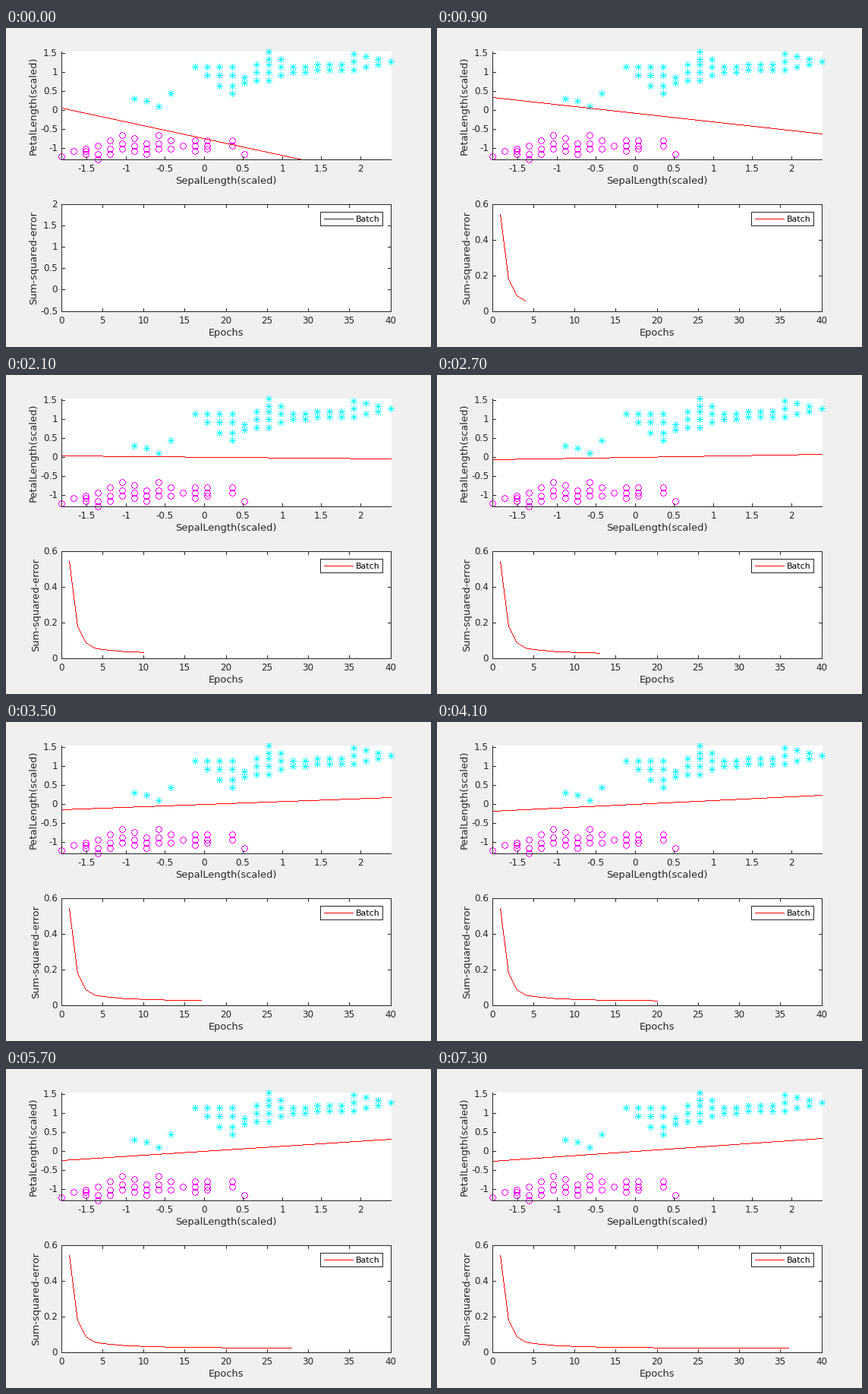
Recreate the animation shown at these times as a matplotlib script. Size 560 px wide and 420 px high, loop 7500 ms.

```python
import numpy as np
import matplotlib.pyplot as plt
from matplotlib.animation import FuncAnimation
from matplotlib.collections import LineCollection
from matplotlib.patches import Rectangle

W, H, DPI = 560, 420, 100
PX = 72 / DPI                      # one pixel in points
INK, RED, CYAN, MAGENTA = "#262626", "#ff0000", "#00ffff", "#ff00ff"
LEFT, RIGHT = 73, 507
TOP1, BOT1 = 31, 173
TOP2, BOT2 = 232, 373
EPOCHS, RATE = 36, 0.5

# sepal and petal length in mm: statistics and extremes
MEAN, SD = np.array([54.71, 28.61]), np.array([6.417, 14.4955])
(xmin, ymin), (xmax, ymax) = (np.array([[43, 10], [70, 51]]) - MEAN) / SD

# outline of each cluster: sepal length, lowest and highest petal length
SMALL = [(43, 11, 11), (44, 13, 14), (46, 10, 15), (48, 14, 19),
         (50, 12, 16), (51, 14, 19), (53, 15, 15), (54, 13, 17),
         (57, 15, 17), (58, 12, 12)]
LARGE = [(49, 33, 33), (51, 30, 30), (54, 45, 45), (57, 35, 45),
         (58, 39, 41), (60, 40, 51), (62, 43, 45), (66, 44, 46),
         (67, 44, 50), (70, 47, 47)]


def cluster(outline, spacing, gap):
    """Fill an outline with evenly spread points, one column per mm."""
    cols, low, high = np.transpose(outline)
    points = []
    for s in range(cols[0], cols[-1] + 1):
        if s == gap:
            continue
        lo, hi = np.interp(s, cols, low), np.interp(s, cols, high)
        count = 1 + round((hi - lo) / spacing)
        points += [(s, p) for p in np.rint(np.linspace(lo, hi, count))]
    return (np.array(points) - MEAN) / SD


def train():
    """Batch gradient descent: weights after and cost before each epoch."""
    cov = np.array([[1, 0, 0], [0, 0.99, 0.80434], [0, 0.80434, 0.99]])
    corr = np.array([0, 0.72464, 0.96513])
    w = np.array([0.95, 0.2382, 0.5035])
    weights, costs = [], []
    for _ in range(EPOCHS):
        costs.append((1 - 2 * corr @ w + w @ cov @ w) / 2)
        w = w + RATE * (corr - cov @ w)
        weights.append(w)
    return weights, np.array(costs)


weights, costs = train()


def to_px(v, lo, hi, a, b):
    """Map lo..hi to whole pixels a..b."""
    pos = a + (np.asarray(v, float) - lo) / (hi - lo) * (b - a)
    return np.floor(pos + 1e-6).astype(int)


def top_x(v):
    return to_px(v, xmin, xmax, LEFT, RIGHT)


def top_y(v):
    return to_px(v, ymax, ymin, TOP1, BOT1)


def epoch_x(v):
    return to_px(v, 0, 40, LEFT, RIGHT)


def trace(xs, ys, bottom):
    """Pixels of a polyline, cut off below the given row."""
    parts = [np.empty((0, 2))]
    for x0, y0, x1, y1 in zip(xs, ys, xs[1:], ys[1:]):
        n = max(abs(x1 - x0), abs(y1 - y0)) + 1
        parts.append(np.column_stack([np.linspace(x0, x1, n),
                                      np.linspace(y0, y1, n)]))
    pixels = np.rint(np.concatenate(parts))
    return dots(pixels[pixels[:, 1] <= bottom])


def dots(pixels):
    """One-pixel dashes."""
    p = np.asarray(pixels, float)
    return np.stack([p + (0, 0.5), p + (1, 0.5)], axis=1)


plt.rcParams["font.family"] = "DejaVu Sans"
fig = plt.figure(figsize=(W / DPI, H / DPI), dpi=DPI, facecolor="#f0f0f0")
ax = fig.add_axes([0, 0, 1, 1])
ax.set_xlim(0, W)
ax.set_ylim(H, 0)
ax.axis("off")


def text(x, y, s, size=12, ha="center", color=INK, rotation=0):
    return ax.text(x, y, s, fontsize=size * PX, ha=ha, va="baseline",
                   color=color, rotation=rotation, rotation_mode="anchor",
                   zorder=6)


def strokes(segments, color=INK, z=5):
    lines = LineCollection(segments, colors=color, linewidths=PX,
                           snap=False, zorder=z)
    return ax.add_collection(lines)


def panel(left, top, right, bottom, z=1):
    ax.add_patch(Rectangle((left, top), right + 1 - left, bottom + 1 - top,
                           facecolor="white", edgecolor="none", snap=False,
                           zorder=z))


def hline(y, x0, x1):
    return [(x0, y + 0.5), (x1 + 1, y + 0.5)]


def vline(x, y0, y1):
    return [(x + 0.5, y0), (x + 0.5, y1 + 1)]


def box(left, top, right, bottom):
    return [hline(top, left, right), hline(bottom, left, right),
            vline(left, top, bottom), vline(right, top, bottom)]


# upper panel: scatter and decision boundary
panel(LEFT, TOP1, RIGHT, BOT1)
segs = [hline(BOT1, LEFT, RIGHT), vline(LEFT, TOP1, BOT1)]
for v in np.arange(-1.5, 2.1, 0.5):
    x = int(top_x(v))
    segs.append(vline(x, BOT1 - 4, BOT1))
    text(x, 189, f"{v:g}")
for v in np.arange(-1, 1.6, 0.5):
    y = int(top_y(v))
    segs.append(hline(y, LEFT, LEFT + 4))
    text(68, y + 4.4, f"{v:g}", ha="right")
strokes(segs)
text(290, 205, "SepalLength(scaled)", 13)
text(40, 102.5, "PetalLength(scaled)", 13, rotation=90)

angles = np.radians(np.arange(0, 360, 15))
ring = np.rint(4 * np.column_stack([np.cos(angles), np.sin(angles)]))
star = np.array([(i * a, i * b) for i in range(-4, 5)
                 for a, b in ((1, 0), (0, 1), (1, 1), (1, -1))
                 if abs(i) < 4 or a * b == 0])
for points, shape, color in ((cluster(SMALL, 2, 56), ring, MAGENTA),
                             (cluster(LARGE, 3, 53), star, CYAN)):
    centres = np.column_stack([top_x(points[:, 0]), top_y(points[:, 1])])
    pixels = (centres[:, None] + shape[None]).reshape(-1, 2)
    strokes(dots(np.unique(pixels, axis=0)), color, 3)
boundary = strokes([], RED, 4)

# lower panel: error curve
panel(LEFT, TOP2, RIGHT, BOT2)
segs = box(LEFT, TOP2, RIGHT, BOT2)
for v in range(0, 41, 5):
    x = int(epoch_x(v))
    segs += [vline(x, BOT2 - 4, BOT2), vline(x, TOP2, TOP2 + 4)]
    text(x, 389, str(v))
strokes(segs)
text(289.5, 405, "Epochs", 13)
error_label = text(43, 302.5, "Sum-squared-error", 13, rotation=90)
y_labels = [text(68, 0, "", ha="right") for _ in range(6)]
y_marks = strokes([])
curve = strokes([], RED, 4)

# legend
panel(414, 242, 496, 260, 4.5)
strokes(box(414, 242, 496, 260))
key = strokes([hline(251, 419, 457)], RED, 6)
text(460.4, 255, "Batch", 11, ha="left", color="black")


def error_ticks(step):
    if step == 0:
        return np.arange(-1, 5) * 0.5
    if step == 1:
        return np.arange(1, 7) * 0.1
    return np.arange(4) * 0.2


def draw(i):
    step = max(0, (i * 100 - 300) // 200)

    b, w1, w2 = weights[step]
    ends = np.array([xmin, xmax])
    boundary.set_segments(trace(top_x(ends), top_y(-(b + w1 * ends) / w2),
                                BOT1))

    ticks = error_ticks(step)
    rows = to_px(ticks, ticks[-1], ticks[0], TOP2, BOT2)
    y_marks.set_segments([hline(y, x, x + 4)
                          for y in rows for x in (LEFT, RIGHT - 4)])
    for n, label in enumerate(y_labels):
        shown = n < len(ticks)
        label.set_visible(shown)
        if shown:
            label.set_text(f"{ticks[n]:g}")
            label.set_y(rows[n] + 4.4)
    error_label.set_x(40 if step == 0 else 43)
    key.set_color(INK if step == 0 else RED)

    done = step + 1
    cost_rows = to_px(costs[:done], ticks[-1], ticks[0], TOP2, BOT2)
    curve.set_segments(trace(epoch_x(np.arange(1, done + 1)), cost_rows,
                             BOT2))
    return boundary, curve


anim = FuncAnimation(fig, draw, frames=75, interval=100, repeat=True,
                     repeat_delay=0, blit=False)
plt.show()
```
